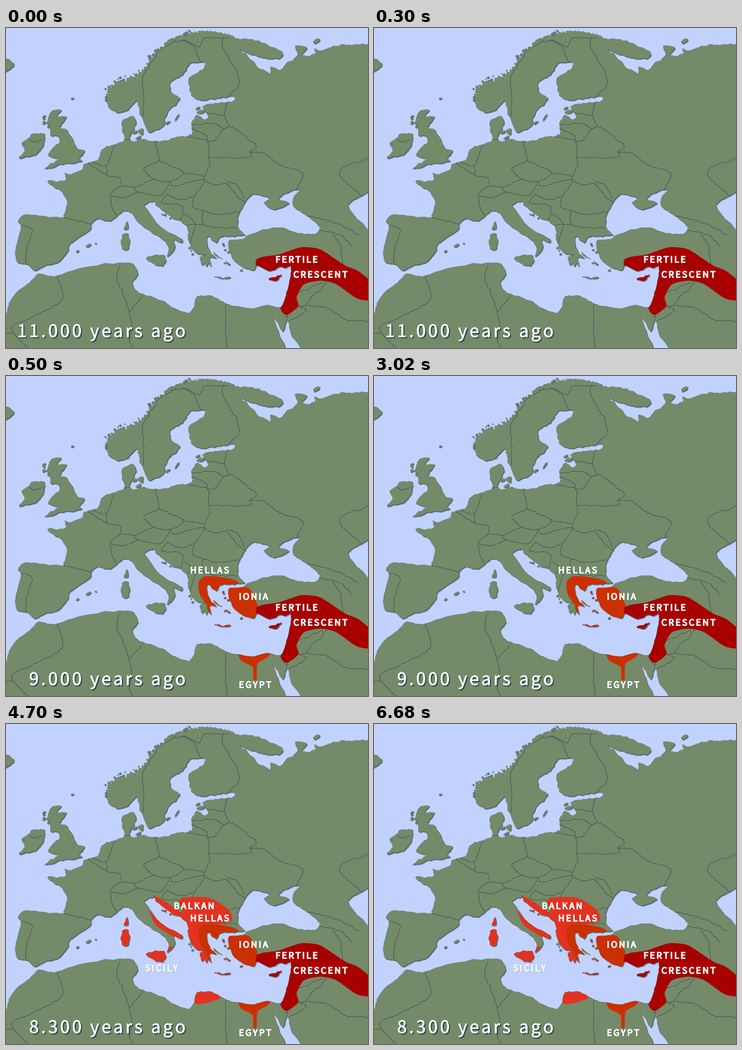
Write a matplotlib script that moves like this. It is 796 px wide and 704 px high and loops after 8000 ms.

```python
import numpy as np
import matplotlib.pyplot as plt
from matplotlib.animation import FuncAnimation
from matplotlib.patches import PathPatch, Polygon
from matplotlib.path import Path
from matplotlib.textpath import TextPath
from matplotlib.transforms import Affine2D

W, H, DPI = 796, 704, 64
STEP, LOOP = 100, 8000
SEA, LAND, INK = "#c1d2ff", "#748a69", "#263643"
FIRST, SECOND, THIRD = "#a80000", "#cc3000", "#e23220"
FONT = {"family": "Noto Sans CJK JP"}
rng = np.random.default_rng(7)


def pts(*v):
    return np.array(v, float).reshape(-1, 2)


def curve(p, n=3, closed=False):
    """Smooth curve through key points, n steps to each span."""
    q = np.vstack([p[-1:], p, p[:2]] if closed else [p[:1], p, p[-1:]])
    t = np.linspace(0, 1, n, endpoint=False)[:, None]
    out = []
    for a, b, c, d in zip(q, q[1:], q[2:], q[3:]):
        s = t * t * (3 - 2 * t)
        out.append(b + s * (c - b) + 0.36 * t * (1 - t)
                   * ((1 - t) * (c - a) - t * (d - b)))
    return np.vstack(out + [p[:1] if closed else p[-1:]])


def rough(p, k, n=1):
    """Midpoint displacement makes a line ragged."""
    for _ in range(n):
        d = np.diff(p, axis=0)
        mid = p[:-1] + d / 2
        mid += d[:, ::-1] * [-1, 1] * rng.uniform(-k, k, (len(d), 1))
        out = np.empty((2 * len(p) - 1, 2))
        out[::2], out[1::2] = p, mid
        p = out
    return p


def coast(*v, k=0.2):
    return rough(curve(pts(*v)), k)


def island(*v):
    return rough(curve(pts(*v), closed=True), 0.2)


def fjords(*v):
    """A coast with every second point pushed inland."""
    p = curve(pts(*v), 7)
    p[1::2] += rng.uniform(1, 9, (len(p[1::2]), 1)) * [0.7, 0.6]
    return p


def speck(x, y, r, lean=0.6):
    a = np.arange(7) * np.pi / 3
    s = r * rng.uniform(0.7, 1.2, 7)
    return np.c_[x + 1.3 * s * np.cos(a), y - 0.9 * s * np.sin(a + lean)]


def scatter(n, x0, y0, x1, y1, r, spread=4):
    """Islets strewn along the line between two points."""
    f = rng.uniform(0, 1, (n, 1))
    c = pts(x0, y0) + f * pts(x1 - x0, y1 - y0) + rng.uniform(-spread, spread, (n, 2))
    return [speck(x, y, r * rng.uniform(0.5, 1.2)) for x, y in c]


# One ring round the mainland, anticlockwise from the north-east
barents = coast(
    800, 36, 765, 37, 735, 37, 705, 46, 690, 50, 678, 45, 681, 55, 665, 62,
    651, 58, 662, 44, 648, 39, 635, 40, 641, 60, 615, 79, 603, 93, 582, 85,
    581, 101, 567, 92, 555, 88, 543, 73, 513, 48, 542, 59, 575, 68, 603, 66,
    608, 54, 575, 37, 535, 25, 500, 22)
norway = fjords(
    500, 18, 484, 12, 450, 6, 418, 7, 392, 13, 360, 24, 332, 47, 316, 66,
    298, 92, 270, 108, 230, 125, 221, 142, 223, 172, 238, 182)
baltic = coast(
    245, 187, 264, 182, 288, 160, 294, 182, 312, 228, 326, 225, 345, 216,
    357, 181, 383, 156, 363, 142, 361, 119, 388, 104, 403, 79, 438, 75, 432, 92,
    402, 111, 407, 148, 432, 159, 464, 154, 500, 149, 500, 160, 460, 165,
    432, 172, 445, 194, 436, 202, 420, 191, 407, 211, 410, 234, 376, 239,
    337, 250, 298, 245, 280, 251)
north_sea = coast(
    280, 251, 271, 240, 286, 211, 279, 194, 255, 206, 260, 246, 235, 257,
    210, 268, 203, 289, 172, 299, 168, 311, 140, 322, 129, 318, 131, 335,
    92, 336, 98, 345, 120, 358, 134, 380, 127, 417)
iberia = coast(
    127, 417, 90, 415, 40, 411, 26, 426, 33, 436, 21, 490, 24, 515, 48, 520,
    63, 534, 85, 523, 115, 515, 137, 490, 140, 475, 185, 444, 187, 430,
    203, 419, 228, 425, 256, 403, 275, 406, 289, 426, 318, 448, 347, 467,
    358, 486, 354, 503, 364, 495, 372, 482, 369, 466, 385, 473, 387, 464,
    352, 446, 330, 428, k=0.12)
aegean = coast(
    330, 428, 312, 401, 304, 390, 325, 380, 331, 391, 362, 414, 398, 437,
    400, 465, 418, 495, 443, 499, 426, 504, 431, 522, 437, 516, 441, 526, 445, 517,
    451, 525, 447, 504, 463, 507, 449, 493, 441, 468, 445, 458, 462, 473,
    470, 460, 490, 458, 512, 457, 526, 455)
black_sea = coast(
    526, 455, 510, 438, 511, 411, 528, 379, 545, 365, 580, 374, 567, 385,
    589, 400, 623, 385, 599, 377, 613, 364, 648, 354, 633, 371, 632, 393,
    660, 412, 690, 437, 680, 453, 645, 452, 605, 439, 570, 443, 529, 457, k=0.12)
levant = coast(
    529, 457, 520, 465, 491, 467, 489, 480, 491, 490, 500, 510, 520, 526,
    545, 533, 552, 522, 580, 535, 602, 525, 614, 528, 626, 523, 625, 550,
    616, 588, 604, 615, 575, 609, 540, 617, 490, 608, 454, 590, 420, 590,
    413, 614, 402, 628, k=0.12)
maghreb = coast(
    402, 628, 366, 615, 345, 600, 293, 583, 277, 560, 290, 543, 281, 520,
    262, 517, 170, 527, 105, 547, 72, 540, 52, 560, 25, 580, 7, 604,
    -2, 640, k=0.1)
red_sea = coast(619, 712, 600, 672, 586, 633, 609, 668, 619, 638, 626, 672,
                654, 712, k=0.1)
caspian = coast(800, 447, 766, 412, 752, 388, 780, 370, 800, 358, k=0.1)
mainland = np.vstack([
    barents, norway, baltic, north_sea, iberia, aegean, black_sea, levant,
    maghreb, pts(-30, 640, -30, 740), red_sea, pts(830, 740, 830, 447), caspian,
    pts(830, 358, 830, 36)])

britain = island(
    104, 181, 122, 180, 111, 195, 134, 195, 117, 218, 135, 225, 156, 264,
    173, 270, 160, 287, 167, 293, 125, 300, 84, 310, 115, 290, 93, 281,
    103, 263, 118, 252, 114, 237, 98, 237, 97, 220, 91, 210, 95, 190)
ireland = island(57, 233, 85, 233, 80, 262, 62, 280, 28, 286, 42, 270, 34, 253, 50, 243)
islands = [
    island(-6, 66, 18, 78, 10, 89, -6, 97),                       # Iceland
    island(375, 194, 381, 190, 371, 206),                         # Gotland
    island(419, 186, 428, 180, 440, 182, 428, 188),               # Saaremaa
    island(289, 227, 301, 221, 300, 235),                         # Zealand
    island(266, 425, 269, 441, 259, 443),                         # Corsica
    island(255, 456, 269, 453, 270, 485, 255, 486),               # Sardinia
    island(309, 505, 349, 500, 345, 524, 315, 513),               # Sicily
    island(458, 546, 495, 549, 475, 552),                         # Crete
    island(577, 552, 606, 542, 594, 556),                         # Cyprus
    island(456, 493, 470, 505, 460, 500)]                         # Euboea
islands += [speck(*s) for s in (
    (683, 28, 7), (422, 176, 4), (283, 229, 5), (292, 241, 5), (356, 208, 4),
    (181, 479, 5), (197, 474, 2), (157, 491, 3), (517, 533, 3), (146, 155, 3))]
islands += (
    scatter(26, 310, 62, 410, 6, 2) + scatter(14, 218, 128, 290, 96, 2)
    + scatter(9, 219, 132, 222, 175, 2, 2) + scatter(7, 82, 190, 92, 225, 3)
    + scatter(5, 335, 402, 362, 420, 2, 2) + scatter(4, 402, 478, 412, 500, 2, 2)
    + scatter(8, 470, 505, 500, 525, 2, 6) + scatter(4, 474, 470, 488, 500, 3))

land = Path.make_compound_path(
    *[Path(np.vstack([p, p[:1]]), closed=True)
      for p in [mainland, britain, ireland] + islands])

# Borders: a few key points each
nordic = [
    pts(301, 196, 303, 140, 301, 106, 340, 48, 388, 27, 425, 42, 437, 22, 489, 22),
    pts(388, 27, 412, 40, 428, 74),
    pts(478, 20, 477, 42, 515, 116, 489, 151),
    pts(487, 161, 481, 193, 490, 216, 478, 222, 460, 211, 407, 213),
    pts(442, 187, 481, 193),
    pts(478, 222, 460, 247, 443, 248, 440, 236, 409, 222)]
eastern = [
    pts(478, 222, 500, 219, 551, 260, 536, 273, 566, 275, 602, 302, 653, 319, 638, 358),
    pts(400, 240, 443, 248, 446, 284, 448, 302, 436, 333, 462, 346, 485, 342,
        510, 372, 526, 383),
    pts(446, 284, 536, 285, 536, 273),
    pts(486, 338, 508, 345, 524, 375),
    pts(800, 286, 740, 308, 737, 329, 782, 368),
    pts(664, 414, 714, 425, 775, 455),
    pts(688, 445, 735, 455, 760, 480),
    pts(717, 452, 735, 478, 741, 520)]
central = [
    pts(328, 250, 337, 292, 303, 309, 325, 333, 361, 338, 391, 319, 337, 292),
    pts(391, 319, 438, 326),
    pts(361, 338, 371, 348, 436, 333, 414, 369, 382, 378, 355, 366),
    pts(325, 333, 284, 351, 291, 361, 340, 369, 361, 338),
    pts(284, 351, 250, 349, 229, 369, 262, 373, 291, 361),
    pts(229, 369, 234, 396, 243, 412),
    pts(250, 349, 253, 331, 222, 324, 180, 298),
    pts(190, 296, 221, 303, 239, 259),
    pts(221, 303, 222, 324),
    pts(260, 247, 272, 245)]
southern = [
    pts(414, 369, 411, 394, 461, 410, 511, 404),
    pts(433, 402, 436, 434, 509, 440),
    pts(355, 366, 342, 385, 388, 391, 384, 425),
    pts(393, 408, 416, 432, 404, 476),
    pts(398, 434, 416, 432, 436, 434),
    pts(33, 434, 58, 444, 45, 490, 44, 519),
    pts(127, 417, 187, 432),
    pts(51, 243, 61, 251, 80, 246)]
desert = [
    pts(113, 547, 124, 599, 45, 641, 15, 655, 17, 672, 52, 708),
    pts(-4, 672, 17, 672),
    pts(252, 522, 244, 550, 271, 625, 277, 660, 271, 688, 282, 708),
    pts(301, 589, 271, 625),
    pts(483, 606, 486, 708),
    pts(603, 615, 618, 637, 621, 614),
    pts(643, 612, 702, 614, 745, 641, 800, 647),
    pts(660, 608, 708, 555),
    pts(643, 612, 661, 622, 621, 645),
    pts(643, 582, 697, 560)]

# Farming areas, drawn loosely and trimmed to the land
crescent = [pts(
    549, 514, 562, 504, 600, 498, 645, 483, 672, 483, 695, 489, 745, 522,
    775, 535, 810, 566, 810, 598, 772, 595, 725, 563, 690, 556, 655, 564,
    639, 592, 643, 612, 618, 631, 604, 618, 606, 560, 560, 560)]
greek = [
    pts(424, 452, 442, 440, 490, 445, 510, 453, 508, 461, 456, 484, 470, 512,
        446, 508, 426, 480),
    pts(442, 504, 470, 513, 450, 528),
    pts(488, 466, 533, 466, 553, 505, 546, 538, 468, 530, 474, 484),
    pts(450, 540, 500, 540, 500, 557, 450, 557)]
delta = [pts(513, 604, 580, 604, 576, 618, 553, 633, 551, 667, 544, 668, 542, 640,
             517, 626)]
expansion = [
    pts(324, 378, 352, 392, 389, 416, 380, 392, 390, 382, 445, 382, 488, 407,
        496, 433, 450, 452, 456, 530, 424, 530, 392, 440, 350, 420),
    pts(316, 410, 335, 432, 392, 464, 386, 477, 330, 443),
    pts(300, 500, 360, 490, 366, 494, 350, 526, 305, 526),
    pts(250, 420, 276, 420, 276, 492, 250, 492),
    pts(405, 585, 450, 584, 474, 601, 440, 614, 414, 614)]

fig = plt.figure(figsize=(W / DPI, H / DPI), dpi=DPI, facecolor=SEA)
ax = fig.add_axes([0, 0, 1, 1])
ax.set(xlim=(0, W), ylim=(H, 0))
ax.axis("off")


def shape(path, dx=0, dy=0, z=1, **kw):
    move = Affine2D().translate(dx, dy) + ax.transData
    return ax.add_patch(PathPatch(path, transform=move, zorder=z, **kw))


for off, alpha in ((2.8, 0.15), (2, 0.35), (1.2, 0.6)):
    shape(land, off * 0.8, off, fc=INK, lw=0, alpha=alpha)
base = shape(land, z=2, fc=LAND, ec="#5f7360", lw=0.5)
for line in nordic + eastern + central + southern + desert:
    x, y = rough(curve(line, 4), 0.14, 2).T
    for d, color, w in ((0.9, "#93a58c", 0.6), (0, INK, 0.95)):
        mark, = ax.plot(x + d, y + d, color=color, lw=w, zorder=3)
        mark.set_clip_path(base)


def area(polys, color, z):
    out = []
    for p in polys:
        patch = ax.add_patch(Polygon(curve(p, 6, True), fc=color, lw=0, zorder=z))
        patch.set_clip_path(base)
        out.append(patch)
    return out


def text_path(s, size, gap):
    """Tracked text on a baseline at y = 0, in stage orientation."""
    def end(t):
        return TextPath((0, 0), t + "|", size=size, prop=FONT).get_extents().x1

    glyphs = [TextPath((end(s[:i]) - end("") + i * gap, 0), c, size=size, prop=FONT)
              for i, c in enumerate(s) if c != " "]
    return Path.make_compound_path(*glyphs).transformed(Affine2D().scale(1, -1))


def label(s, x, y):
    p = text_path(s, 19, 3.4)
    x -= p.get_extents().x0
    return [shape(p, x + 1, y + 1, 8, fc=INK, ec=INK, lw=1.3, alpha=0.25),
            shape(p, x, y, 9, fc="white", ec="white", lw=1.7)]


def title(s):
    p = text_path(s, 38, 5.1)
    x = 393 - p.get_extents().x1
    return [shape(p, x + 2.4, 682.6, 8, fc=INK, ec=INK, lw=1.6, alpha=0.35),
            shape(p, x + 1.6, 681.6, 8, fc=INK, ec=INK, lw=1, alpha=0.85),
            shape(p, x, 680, 9, fc="white", ec="white", lw=1)]


area(crescent, FIRST, 6)
label("FERTILE", 594.5, 516)
label("CRESCENT", 633, 549)
second = (area(greek + delta, SECOND, 5) + label("HELLAS", 407, 434)
          + label("IONIA", 514, 492) + label("EGYPT", 514, 686))
third = (area(expansion, THIRD, 4) + label("BALKAN", 371, 407)
         + label("SICILY", 307, 544))
titles = [title(f"{n} years ago") for n in ("11.000", "9.000", "8.300")]


def update(i):
    t = i * STEP
    stage = (t >= 500) + (t >= 4700)
    for a in second:
        a.set_visible(stage >= 1)
    for a in third:
        a.set_visible(stage >= 2)
    for n, group in enumerate(titles):
        for a in group:
            a.set_visible(n == stage)
    return []


anim = FuncAnimation(fig, update, frames=LOOP // STEP, interval=STEP,
                     repeat=True, repeat_delay=0, blit=False)
plt.show()
```
